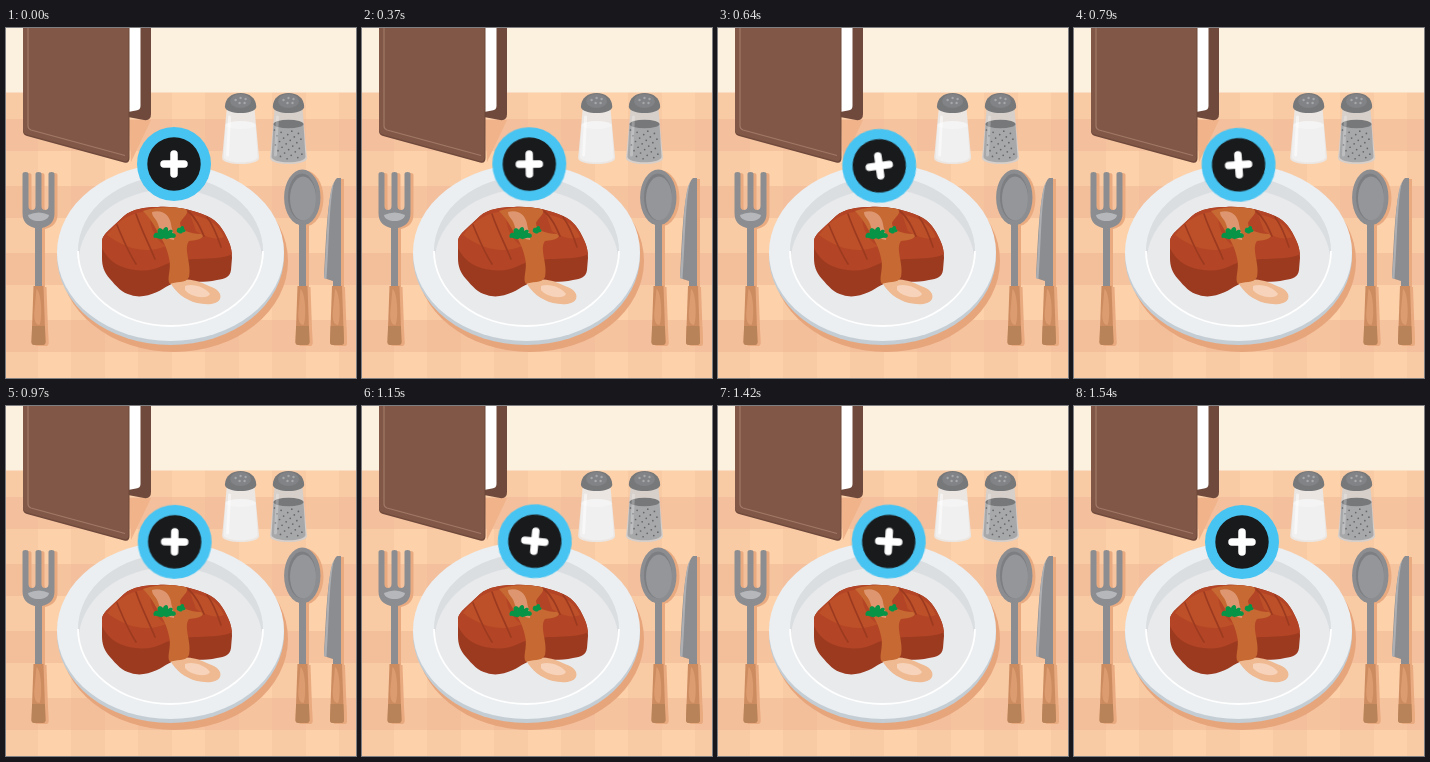
These frames come from a looping animation (350 px wide and 350 px high, 1870 ms). An HTML page:

```html
<!DOCTYPE html>
<html lang="en">
<head>
<meta charset="utf-8">
<title>Dinner table</title>
<style>
  html, body { margin: 0; width: 100%; height: 100%; overflow: hidden; }
  svg { display: block; width: 100vw; height: 100vh; }
  #cutlery { filter: drop-shadow(3px 1px 0 #e9aa80); }
</style>
</head>
<body>
<svg viewBox="0 0 350 350">
  <defs>
    <g id="handle">
      <path d="M-5 258H5L7 314Q7 317 4 317H-4Q-7 317-7 314Z" fill="#cd8c60"/>
      <path d="M-6.400 298H6.400L7 314Q7 317 4 317H-4Q-7 317-7 314Z" fill="#b88358"/>
      <path d="M-2 261C3 264 4 290 1 297C-3 297-5 292-4 282Z" fill="#dc9c70"/>
    </g>
    <g id="cap">
      <path d="M-15.700 79C-15.500 70-9 65 0 65S15.500 70 15.700 79C14 87-14 87-15.700 79Z" fill="#77787a"/>
      <ellipse cy="73" rx="10.500" ry="7" fill="#828386"/>
      <g fill="#a5a7a9"><circle cx="-5" cy="72" r="1.200"/><circle cy="70" r="1.200"/><circle cx="5" cy="71" r="1.200"/><circle cx="-1" cy="75" r="1.200"/><circle cx="4" cy="75" r="1.200"/></g>
    </g>
    <clipPath id="well"><ellipse cx="164.500" cy="223" rx="92.500" ry="75"/></clipPath>
    <clipPath id="meat"><path id="steak" d="M96 214C96 209 99 206 103 202L118 188C126 181 139 179 152 179C170 178 187 182 201 188C212 193 217 201 222 212C225 218 226 224 226 230L225 242C224 249 219 251 211 252C198 255 186 253 178 254C164 254 160 260 151 264C142 268 133 270 125 267C116 265 110 258 104 251C98 244 96 238 96 230Z"/></clipPath>
  </defs>

  <rect width="350" height="350" fill="#fdd1aa"/>
  <g id="cloth" fill="#e5a587"/>
  <rect width="350" height="64.500" fill="#fcf0df"/>

  <!-- menu -->
  <path d="M123 92H145L125 134Z" fill="#f0b38a"/>
  <path d="M122 0H145V86Q145 93 138 92L122 89Z" fill="#6f493b"/>
  <path d="M122 0H134.500V78Q134.500 82 130 82.500L122 84Z" fill="#fff"/>
  <path d="M17 0H123.500V130Q123.500 136 118 134.500L21 108Q17 107 17 103Z" fill="#6f493b"/>
  <path d="M17 0H122.500V129Q122.500 134 118 133L21 106.500Q17 105.500 17 101.500Z" fill="#815847"/>
  <path d="M22 0V98Q22 101 25 102L119 127.500" fill="none" stroke="#a17866" stroke-width="1.200"/>

  <!-- shakers -->
  <g transform="translate(234.600)">
    <path d="M-14 82H14L18.500 130C18 138-18 138-18.500 130Z" fill="#ebe6e2"/>
    <path d="M-15 97H15L17 129C16 136-16 136-17 129Z" fill="#f0f0f0"/>
    <ellipse cy="97" rx="15" ry="4" fill="#f4f4f4"/>
    <path d="M-11 89L-13 127" stroke="#fff" stroke-opacity=".5" stroke-width="3" stroke-linecap="round"/>
    <use href="#cap"/>
  </g>
  <g transform="translate(282.500)">
    <path d="M-14 82H14L18.500 130C18 138-18 138-18.500 130Z" fill="#d6cfca"/>
    <path d="M-15 96H15L17 129C16 136-16 136-17 129Z" fill="#a7a8aa"/>
    <g id="pepper" fill="#66676a"/>
    <ellipse cy="96" rx="15" ry="4.300" fill="#77787a"/>
    <path d="M-11 89L-13 127" stroke="#fff" stroke-opacity=".25" stroke-width="3" stroke-linecap="round"/>
    <use href="#cap"/>
  </g>

  <!-- plate -->
  <ellipse cx="168" cy="233" rx="114" ry="91" fill="#e7a57c"/>
  <ellipse cx="164.500" cy="228" rx="113.500" ry="89" fill="#c3cdd3"/>
  <ellipse cx="164.500" cy="224.500" rx="113.500" ry="88.500" fill="#ebeff2"/>
  <g clip-path="url(#well)">
    <rect x="70" y="145" width="190" height="156" fill="#dbdee0"/>
    <ellipse cx="164.500" cy="235" rx="92" ry="74" fill="#e8eaec"/>
  </g>
  <path d="M72 223A92.500 75 0 0 0 257 223" fill="none" stroke="#fff" stroke-width="1.800"/>

  <!-- steak -->
  <use href="#steak" fill="#9c3a20"/>
  <g clip-path="url(#meat)">
    <path d="M90 170H230V224C220 231 206 230 192 231C178 231 166 233 156 238C142 245 124 243 112 237C103 232 98 225 94 216Z" fill="#b34425"/>
    <path d="M101 207C112 192 126 183 146 183C141 193 148 211 160 218C142 226 121 222 101 207ZM184 186C203 190 213 197 218 209C208 213 198 208 190 203Z" fill="#bd5029"/>
    <path d="M111 197C117 211 121 222 130 236M130 186C135 201 142 214 149 231M182 183C190 190 194 199 198 208M201 189C207 197 211 207 215 219" fill="none" stroke="#9c3a20" stroke-width="1.700" stroke-linecap="round"/>
  </g>
  <path d="M164 254C175 249 190 251 203 258C212 261 216 266 214 271C211 277 200 277 191 275C179 272 169 264 164 254Z" fill="#efb991"/>
  <path d="M179 258C188 255 200 260 204 266C201 272 184 269 179 262Z" fill="#f6d3ba"/>
  <path d="M137 183C147 179 166 178 179 181C185 184 177 189 174 195C174 202 184 206 195 206C200 209 194 212 183 213C177 221 186 236 183 249C180 256 169 253 164 256C160 251 166 241 163 230C160 216 155 210 150 201C146 193 141 187 137 183Z" fill="#c66932"/>
  <path d="M146 184C157 181 164 188 165 196C166 203 169 207 168 212C158 211 154 203 152 196C150 190 146 189 146 184Z" fill="#dd9670"/>
  <path d="M148 210C146 206 150 204 152 205C150 200 155 199 157 202C159 197 163 199 162 203C166 200 168 203 166 205C171 205 171 210 167 210C163 209 161 213 158 210C154 213 152 209 148 210ZM171 204C170 200 173 199 174 200C176 196 179 199 178 201C181 202 179 205 177 204C175 207 173 205 171 204Z" fill="#079447"/>

  <g id="cutlery">
    <g fill="#8b8d90">
      <path d="M16.500 146Q16.500 144 19.500 144T22.500 146V178Q22.500 182 26 182T29.500 178V146Q29.500 144 32.500 144T35.500 146V178Q35.500 182 39 182T42.500 178V146Q42.500 144 45.500 144T48.500 146V185C48.500 195 43 198 36 200V258H29V200C22 198 16.500 195 16.500 185Z"/>
      <path d="M22 187Q33 182 43 187C42 195 23 195 22 187Z" fill="#b5b7ba"/>
      <path d="M293 190H300V258H293Z"/>
      <ellipse cx="296.300" cy="169.500" rx="18.200" ry="28"/>
      <ellipse cx="296" cy="169" rx="14" ry="23.500" fill="#7c7e81"/>
      <ellipse cx="297" cy="170.500" rx="13" ry="22" fill="#949699"/>
      <path d="M335 150V258H327V253L318 250C320 216 321 158 331 150Z"/>
      <path d="M328 154C321 164 321 220 318 250L320.500 251C323 220 323 175 328 154Z" fill="#adafb2"/>
    </g>
    <use href="#handle" x="32.500"/>
    <use href="#handle" x="296.500"/>
    <use href="#handle" x="331"/>
  </g>

  <g id="badge">
    <circle cx="168" cy="136" r="37" fill="#48c4f2"/>
    <circle cx="168" cy="136" r="26.700" fill="#191a1c"/>
    <path d="M158 136H178M168 126V146" stroke="#fff" stroke-width="7.500" stroke-linecap="round"/>
  </g>
</svg>
<script>
  const byId = id => document.getElementById(id);

  function add(parent, tag, attrs) {
    const el = document.createElementNS("http://www.w3.org/2000/svg", tag);
    for (const key in attrs) el.setAttribute(key, attrs[key]);
    parent.append(el);
  }

  // Checked cloth: level bands crossed by upright stripes.
  const CHECK = 67;
  for (let i = 0; i < 6; i++) {
    add(byId("cloth"), "rect", { y: 91 + i * CHECK, width: 350, height: 32, opacity: .32 });
    add(byId("cloth"), "rect", { x: i * CHECK - 2, width: 34, height: 350, opacity: .16 });
  }

  for (let i = 0; i < 26; i++)
    add(byId("pepper"), "circle", {
      cx: (i * 0.618 % 1 - .5) * 28, cy: 102 + i * 1.15, r: .85
    });

  // The badge rocks left, right and back at constant speed, in 30 ms steps.
  const LOOP = 1870, START = 340, STEP = 30, QUARTER = 10, MAX_ANGLE = 8;

  function draw(now) {
    const time = now % LOOP;
    const step = Math.max(0, Math.min(4 * QUARTER, Math.floor((time - START) / STEP)));
    const swing = Math.abs(Math.abs(step - QUARTER) - 2 * QUARTER) - QUARTER;
    const angle = -MAX_ANGLE * swing / QUARTER;
    byId("badge").setAttribute("transform", `rotate(${angle} 178 185)`);
    requestAnimationFrame(draw);
  }
  draw(0);
</script>
</body>
</html>
```
